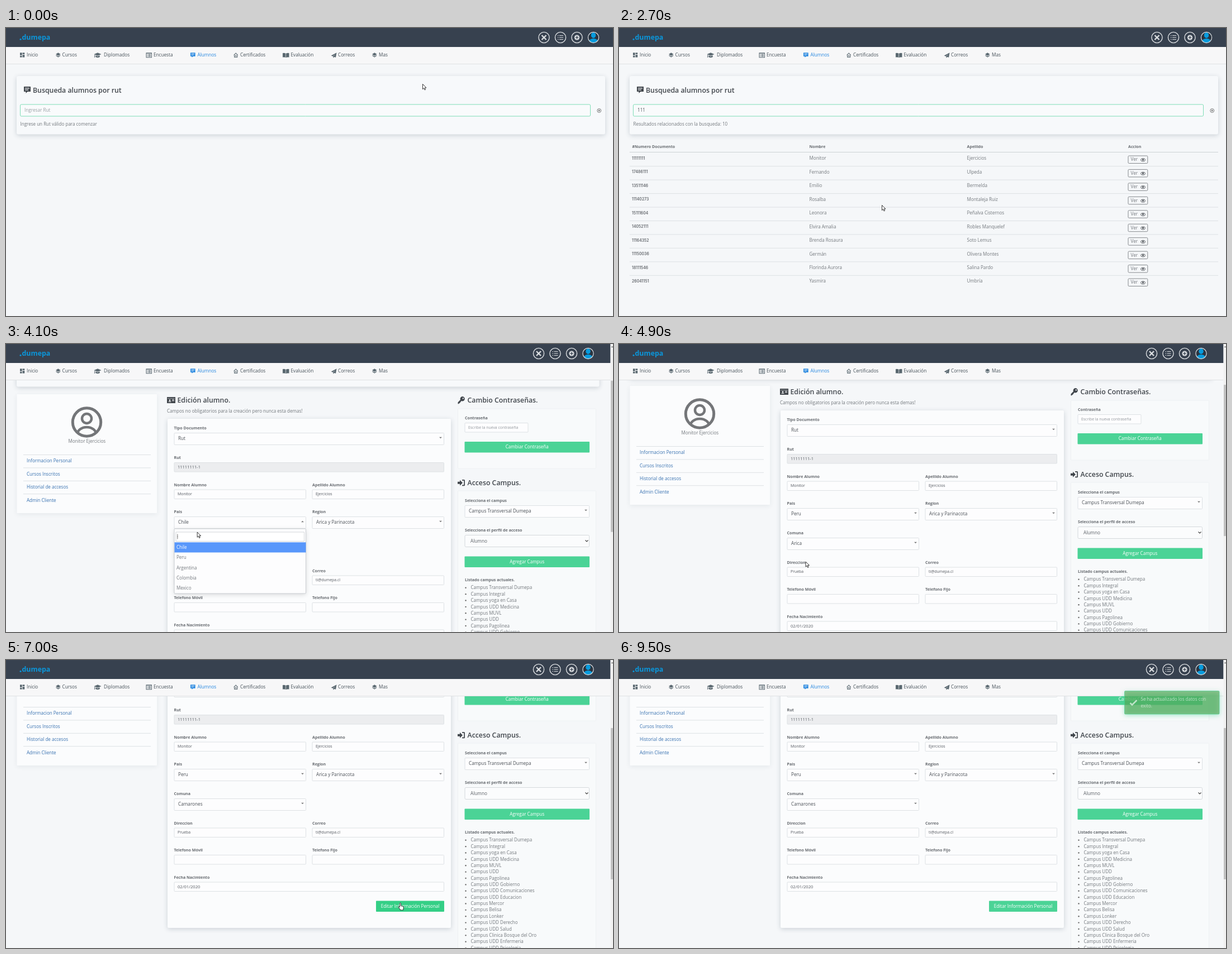
An HTML page with a canvas that plays this animation: 1086 px wide and 516 px high, repeating every 9.6 s.

```html
<!DOCTYPE html>
<html lang="es">
<head>
<meta charset="utf-8">
<title>Busqueda alumnos</title>
<style>
html, body { margin: 0; width: 100%; height: 100%; overflow: hidden; background: #f5f7f9; }
canvas { display: block; width: 1086px; height: 516px; }
</style>
</head>
<body>
<canvas id="stage"></canvas>
<script>
const LOOP = 9600, STEP = 100, W = 1086, H = 516;
const canvas = document.getElementById('stage');
const c = canvas.getContext('2d');
const dpr = window.devicePixelRatio || 1;
canvas.width = W * dpr;
canvas.height = H * dpr;

const GREY = '#73787d', DARK = '#41464c', LABEL = '#676b70', LINE = '#dde1e4', GREEN = '#4bd396';
const BASE_SCROLL = 109;   // scroll offset at which the form coordinates below are given
const PAGE_CHANGE = 2800;

const ICONS = {
  grid: 'M0 0h3.7v4.6H0zM4.6 0h3.7v2.8H4.6zM0 5.5h3.7v2.8H0zM4.6 3.7h3.7v4.6H4.6z',
  layers: 'M4.3 0l4.3 2.8-4.3 2.8L0 2.8zM1 4.5l3.3 2 3.3-2 1 .8-4.3 2.9L0 5.3z',
  cap: 'M0 2.8L6.5 0 13 2.8 6.5 5.6zM2.8 4.9l3.7 1.7 3.7-1.7v3q-3.7 2-7.4 0zM.8 3.5h.8v5H.4z',
  table: 'M0 0h10.5v9H0zM1 1.6h8.5V8H1zM2 2.6h1v1H2zM4 2.6h4.5v1H4zM2 4.3h1v1H2zM4 4.3h4.5v1H4zM2 6h1v1H2zM4 6h4.5v1H4z',
  comment: 'M0 0h12v9H6.5L3.5 12V9H0zM2 2.3h8v1.2H2zM2 5.2h6v1.2H2z',
  home: 'M4.2 0l4.2 4.2H7.3v4.3H1.1V4.2H0zM4.2 1.6L2.2 3.6v3.8h4V3.6zM3.4 4.2H5v2H3.4z',
  book: 'M0 .8Q3 0 5.4 1.2v7.6Q3 7.6 0 8.3zM6.1 1.2Q9 0 11.5.8v7.5Q9 7.6 6.1 8.8z',
  plane: 'M10 0L8.5 8.6 5.7 7.5 4.2 9.6 3.6 6.6 0 5.2zM8 2.2L3.8 6l.7.3z',
  idCard: 'M0 0h15v11H0zM1 2h13v.6H1zM5 4.3a1.4 1.4 0 1 0 .01 0zM2.3 9q.2-1.6 2.7-1.6T7.7 9zM9 4.2h4v1H9zM9 6.3h4v1H9z',
  key: 'M8.3 0a4.2 4.2 0 1 1-2 8L5 9.2v1.4H3.6V12H2v1.3H0v-2.8l4.4-4.6A4.2 4.2 0 0 1 8.3 0zM9.3 2.2a1.2 1.2 0 1 0 .01 0z',
  signIn: 'M0 3.8h4V.8l5 5-5 5v-3H0zM8 0h3.5Q13 0 13 1.5v8.3q0 1.5-1.5 1.5H8V9.6h3.3V1.7H8z',
  arrow: 'M0 0v9.2l2.1-2 1.5 3.3 1.5-.7-1.5-3.2h2.9z',
  hand: 'M-1 1q0-1.2 1-1.2t1 1.2v4l4 1q1 .3.9 1.5l-.6 3.5v1.5h-5.5l-.3-1.5-3-3.5q-.2-1.5 1.2-1l1.3 1z'
};
for (const name in ICONS) ICONS[name] = new Path2D(ICONS[name]);

const NAV = [
  ['grid', 25, 'Inicio', 37], ['layers', 89, 'Cursos', 100.5], ['cap', 157.5, 'Diplomados', 175],
  ['table', 250.5, 'Encuesta', 264], ['comment', 330, 'Alumnos', 342.5], ['home', 407, 'Certificados', 419],
  ['book', 495, 'Evaluación', 509.5], ['plane', 581.5, 'Correos', 594], ['layers', 655, 'Mas', 667]
];
const STUDENTS = [
  ['11111111', 'Monitor', 'Ejercicios'], ['17486111', 'Fernando', 'Ulpeda'],
  ['13511146', 'Emilio', 'Bermelda'], ['11140273', 'Rosalba', 'Montaleja Ruiz'],
  ['15111604', 'Leonora', 'Peñalva Cisternos'], ['14052111', 'Elvira Amalia', 'Robles Manquelef'],
  ['11164352', 'Brenda Rosaura', 'Soto Lemus'], ['11150036', 'Germán', 'Olivera Montes'],
  ['18111546', 'Florinda Aurora', 'Salina Pardo'], ['26041151', 'Yasmira', 'Umbría']
];
const CAMPUSES = ['Transversal Dumepa', 'Integral', 'yoga en Casa', 'UDD Medicina', 'MUVL', 'UDD', 'Pagolinea',
  'UDD Gobierno', 'UDD Comunicaciones', 'UDD Educacion', 'Mercor', 'Belisa', 'Lonker', 'UDD Derecho',
  'UDD Salud', 'Clinica Bosque del Oro', 'UDD Enfermeria', 'UDD Psicologia'];
const COUNTRIES = ['Chile', 'Peru', 'Argentina', 'Colombia', 'Mexico'];
const COMMUNES = ['Arica', 'Camarones', 'General Lagos', 'Putre', 'Alto Hospicio', 'Iquique'];

// time, x, y of the pointer tip
const POINTER = [
  [0, 745.5, 100.5], [100, 735, 102], [700, 235, 146], [1000, 325, 163], [1300, 325, 163], [1900, 925, 232],
  [2200, 925, 234], [2700, 470.5, 317.5], [3200, 355, 365.5], [3600, 345, 320], [4000, 345, 320],
  [4300, 334, 386], [4900, 334, 390], [5300, 334, 385], [5700, 334.5, 257], [5900, 334.5, 257],
  [6300, 331, 320], [6500, 331, 321], [7000, 705.5, 435.5], [LOOP, 705.5, 435.5]
];
const HAND_SPANS = [[1800, 2300], [3600, 4100], [5700, 6000], [6900, 9300]];

const within = (t, from, to) => t >= from && t < to;
const clamp = v => Math.max(0, Math.min(1, v));
const smooth = v => { v = clamp(v); return v * v * (3 - 2 * v); };

function text(s, x, y, { size = 8.05, color = GREY, weight = 400, align = 'left', font = '"Open Sans", "Noto Sans"' } = {}) {
  c.font = `${weight} ${size}px ${font}, sans-serif`;
  c.textAlign = align;
  c.fillStyle = color;
  c.fillText(s, x, y + size * .36);
}
const label = (s, x, y) => text(s, x, y, { size: 7.1, weight: 700, color: LABEL });
const heading = (s, x, y) => text(s, x, y, { size: 12.3, weight: 600, color: DARK });

function box(x, y, right, bottom, { fill, stroke, radius = 1, shadow } = {}) {
  c.save();
  c.beginPath();
  c.roundRect(x, y, right - x, bottom - y, radius);
  if (shadow) { c.shadowColor = shadow; c.shadowBlur = 9 * dpr; c.shadowOffsetY = 2 * dpr; }
  if (fill) { c.fillStyle = fill; c.fill(); }
  c.shadowColor = 'transparent';
  if (stroke) { c.strokeStyle = stroke; c.lineWidth = 1; c.stroke(); }
  c.restore();
}

function rule(x, right, y, color = LINE) {
  c.fillStyle = color;
  c.fillRect(x, y - .5, right - x, 1);
}

function icon(name, x, y, color, scale = 1) {
  c.save();
  c.translate(x, y);
  c.scale(scale, scale);
  c.fillStyle = color;
  c.fill(ICONS[name], 'evenodd');
  c.restore();
}

function circle(x, y, r, { fill, stroke, width = 1 }) {
  c.beginPath();
  c.arc(x, y, r, 0, Math.PI * 2);
  if (fill) { c.fillStyle = fill; c.fill(); }
  if (stroke) { c.strokeStyle = stroke; c.lineWidth = width; c.stroke(); }
}

function line(points, color, width) {
  c.beginPath();
  points.forEach(([x, y]) => c.lineTo(x, y));
  c.strokeStyle = color;
  c.lineWidth = width;
  c.stroke();
}

function triangle(x, y, up, size = 2.4, color = '#777') {
  const d = up ? -1 : 1;
  c.beginPath();
  c.moveTo(x - size, y - d * size / 2);
  c.lineTo(x + size, y - d * size / 2);
  c.lineTo(x, y + d * size / 2);
  c.fillStyle = color;
  c.fill();
}

function input(value, x, right, y, { fill = '#fdfdfe', size = 6.9, color = '#555a60' } = {}) {
  box(x, y + .5, right, y + 17, { fill, stroke: LINE });
  text(value, x + 6, y + 8.5, { size, color });
}

function select(value, x, right, y, open) {
  box(x, y + .5, right, y + 21.5, { fill: '#fdfdfe', stroke: LINE });
  text(value, x + 7, y + 10.5, { size: 8.2, color: '#4b5056' });
  triangle(right - 6, y + 9, open);
}

function button(caption, x, right, y, fill = GREEN) {
  box(x, y, right, y + 19.5, { fill });
  text(caption, (x + right) / 2, y + 9.3, { color: '#fff', align: 'center' });
}

function dropdown(options, active, y, scrollable) {
  const bottom = scrollable ? y + 161 : y + 47 + options.length * 18.2;
  const right = scrollable ? 526.5 : 536.5;
  box(301, y + 22, 536.5, bottom, { fill: '#fdfdfe', stroke: '#c9cdd1', shadow: 'rgba(0,0,0,.15)' });
  box(304, y + 28, 533.5, y + 44.5, { fill: '#fff', stroke: '#d3d7da', radius: 0 });
  rule(306.5, 307.3, y + 36, '#555');
  c.fillStyle = '#555';
  c.fillRect(306.5, y + 31.5, .8, 9);
  options.forEach((option, i) => {
    const on = i === active;
    if (on) box(301.5, y + 46.5, right, y + 46.5, {});
    if (on) { c.fillStyle = '#5897fb'; c.fillRect(301.5, y + 46.3 + i * 18.2, right - 301.5, 18.2); }
    text(option, 305, y + 55.3 + i * 18.2, { color: on ? '#fff' : GREY });
  });
  if (!scrollable) return;
  c.fillStyle = '#f1f1f1';
  c.fillRect(526.5, y + 46.3, 9.5, 114);
  c.fillStyle = '#c1c1c1';
  c.fillRect(527.5, y + 56, 7.5, 10);
  triangle(531.3, y + 52, true, 2, '#999');
  triangle(531.3, y + 155.5, false, 2, '#444');
}

function searchCard(right, query, hint) {
  box(19, 86, right, 190.5, { fill: '#f7f9fb', radius: 3, shadow: 'rgba(40,60,80,.2)' });
  icon('comment', 32, 105, DARK);
  heading('Busqueda alumnos por rut', 48, 111.5);
  box(25.5, 137, right - 26.5, 158, { fill: '#f9fbfc', stroke: '#7fdcb6', radius: 2 });
  text(query || 'Ingresar Rut', 33, 147, { size: 8.2, color: query ? '#555a60' : '#9aa0a5' });
  circle(right - 10.8, 148, 3.4, { stroke: '#666', width: .9 });
  circle(right - 10.8, 148, 1.4, { fill: '#777' });
  text(hint, 25.5, 172);
}

function resultsTable() {
  [['#Numero Documento', 23.5], ['Nombre', 340.5], ['Apellido', 622.5], ['Accion', 911]]
    .forEach(([s, x]) => label(s, x, 212));
  rule(19, 1072, 222.5, '#cdd2d5');
  STUDENTS.forEach(([id, first, last], i) => {
    const y = 233.5 + i * 24.45;
    text(id, 23, y, { size: 6.9, weight: 600, color: '#63676c', font: 'Inter' });
    text(first, 340.5, y);
    text(last, 622.5, y);
    box(911, y - 4.5, 945.8, y + 9, { stroke: '#85898d', radius: 1.5 });
    text('Ver', 915.5, y + 2);
    c.beginPath();
    c.ellipse(937.5, y + 2.8, 4, 2.6, 0, 0, Math.PI * 2);
    c.strokeStyle = '#5c6065';
    c.lineWidth = 1;
    c.stroke();
    circle(937.5, y + 2.5, 1.7, { fill: '#5c6065' });
    if (i < 9) rule(19, 1072, y + 14.2);
  });
}

function profileCard() {
  box(19.5, 95, 270, 308, { fill: '#fbfcfd', shadow: 'rgba(40,60,80,.08)' });
  c.save();
  circle(144.5, 145, 25.2, { stroke: '#747679', width: 5 });
  circle(144.5, 138.5, 8.5, { stroke: '#747679', width: 4.5 });
  c.beginPath();
  c.arc(144.5, 145, 25, 0, Math.PI * 2);
  c.clip();
  c.beginPath();
  c.ellipse(144.5, 167, 17, 13, 0, Math.PI, 0);
  c.strokeStyle = '#747679';
  c.lineWidth = 4.5;
  c.stroke();
  c.restore();
  text('Monitor Ejercicios', 144.8, 179.5, { align: 'center' });
  ['Informacion Personal', 'Cursos Inscritos', 'Historial de accesos', 'Admin Cliente'].forEach((s, i) => {
    rule(31, 259, 203.5 + i * 23.4);
    text(s, 37, 214.5 + i * 23.4, { color: '#3670b0' });
  });
}

function studentForm(t) {
  const countryOpen = within(t, 3900, 4500), communeOpen = within(t, 5800, 6600);
  icon('idCard', 288, 100, DARK);
  heading('Edición alumno.', 306.5, 106);
  text('Campos no obligatorios para la creación pero nunca esta demas!', 288, 125.5);
  box(289, 139, 796, 599, { fill: '#fbfcfd', radius: 2, shadow: 'rgba(40,60,80,.2)' });
  [['Tipo Documento', 300.5, 155.5], ['Rut', 300.5, 208.5], ['Nombre Alumno', 300.5, 257], ['Apellido Alumno', 548, 257],
    ['Pais', 300.5, 305.5], ['Region', 548, 305.5], ['Comuna', 300.5, 358], ['Direccion', 300.5, 411],
    ['Correo', 548, 411], ['Telefono Móvil', 300.5, 459.5], ['Telefono Fijo', 548, 459.5], ['Fecha Nacimiento', 300.5, 508]
  ].forEach(args => label(...args));
  select('Rut', 301, 783.5, 164);
  input('11111111-1', 301, 783.5, 217, { fill: '#ecedef', size: 7.5 });
  input('Monitor', 301, 536.5, 265.5);
  input('Ejercicios', 548, 783.5, 265.5);
  select(t < 4500 ? 'Chile' : 'Peru', 301, 536.5, 314, countryOpen);
  select('Arica y Parinacota', 548, 783.5, 314);
  select(t < 6600 ? 'Arica' : 'Camarones', 301, 536.5, 367, communeOpen);
  input('Prueba', 301, 536.5, 419.5);
  input('ti@dumepa.cl', 548, 783.5, 419.5);
  input('', 301, 536.5, 468);
  input('', 548, 783.5, 468);
  input('02/01/2020', 301, 783.5, 516.5, { size: 7.6 });
  button('Editar Información Personal', 662, 784, 550.5, within(t, 6900, 9300) ? '#34cf86' : GREEN);
  if (countryOpen) dropdown(COUNTRIES, t < 4200 ? 0 : 1, 314, false);
  if (communeOpen) dropdown(COMMUNES, t < 6200 ? 0 : 1, 367, true);
}

function accessPanels() {
  icon('key', 808.5, 99, DARK);
  heading('Cambio Contraseñas.', 825.5, 106);
  box(808.5, 121, 1055.5, 228, { fill: '#f8fafb', stroke: '#eef1f3' });
  label('Contraseña', 821, 137.5);
  input('Escribe la nueva contraseña', 821, 934, 146, { color: '#92979c' });
  button('Cambiar Contraseña', 820.5, 1044, 180);
  icon('signIn', 808, 248, DARK);
  heading('Acceso Campus.', 825.5, 254);
  box(808.5, 268, 1055.5, 700, { fill: '#f8fafb', stroke: '#eef1f3' });
  label('Selecciona el campus', 821, 285.5);
  select('Campus Transversal Dumepa', 821, 1043.5, 294);
  label('Selecciona el perfil de acceso', 821, 338.5);
  box(821, 347.5, 1043.5, 368.5, { fill: '#fbfcfd', stroke: '#d5d9dc', radius: 2 });
  text('Alumno', 831, 358, { size: 8.2, color: '#5b6066' });
  line([[1036.5, 356.5], [1039, 359], [1041.5, 356.5]], '#444', 1.2);
  button('Agregar Campus', 820.5, 1044, 385.5);
  label('Listado campus actuales.', 821, 427.5);
  CAMPUSES.forEach((s, i) => {
    const y = 441.5 + i * 11.37;
    circle(822.5, y + .3, 1.2, { fill: '#666' });
    text('Campus ' + s, 831.5, y);
  });
}

function topBars(shift, right) {
  c.fillStyle = '#f7f7f8';
  c.fillRect(0, 34, right, 30);
  rule(0, right, 64.5, '#e0e2e4');
  c.fillStyle = '#37414f';
  c.fillRect(0, 0, right, 34);
  circle(26, 20.3, 1.5, { fill: '#0a97dc' });
  text('dumepa', 28.5, 16.5, { size: 12.4, weight: 700, color: '#0a97dc' });
  const light = '#dadde0', [tools, list, add, user] = [962.5, 992, 1021.5, 1051].map(x => x - shift);
  [tools, list, add].forEach(x => circle(x, 17, 9.6, { stroke: light, width: 1.4 }));
  line([[tools - 4, 13], [tools + 4, 21]], light, 2.4);
  line([[tools + 4, 13], [tools - 4, 21]], light, 2.4);
  [13.5, 17, 20.5].forEach(y => {
    rule(list - 5, list - 3.5, y, light);
    rule(list - 2, list + 5, y, light);
  });
  circle(add, 17, 4.6, { fill: light });
  line([[add - 2.7, 17], [add + 2.7, 17]], '#37414f', 1.3);
  line([[add, 14.3], [add, 19.7]], '#37414f', 1.3);
  c.save();
  circle(user, 17, 9.6, { fill: '#2b3440' });
  c.clip();
  c.fillStyle = '#079bdd';
  c.beginPath();
  c.ellipse(user, 13, 4.2, 5, 0, 0, Math.PI * 2);
  c.ellipse(user, 25.5, 8.5, 6.8, 0, 0, Math.PI * 2);
  c.fill();
  c.restore();
  circle(user, 17, 9.6, { stroke: light, width: 1.2 });
  NAV.forEach(([name, x, s, textX]) => {
    const active = s === 'Alumnos';
    icon(name, x, 44.2, active ? '#2587e0' : '#5a6870', active ? .72 : 1);
    text(s, textX, 48.2, { size: 8.2, color: active ? '#2587e0' : '#465159' });
  });
}

function scrollbar(scroll) {
  c.fillStyle = '#f1f1f1';
  c.fillRect(1081.5, 0, 4.5, H);
  c.fillStyle = '#c1c1c1';
  c.fillRect(1082, 9.5 + scroll * .493, 4, 271);
  triangle(1084.5, 5, true, 1.8, '#666');
}

function toast(t) {
  const alpha = smooth((t - 7700) / 500) * (1 - smooth((t - 9200) / 1000));
  if (!alpha) return;
  c.save();
  c.globalAlpha = alpha * .8;
  box(904.5, 55.5, 1074, 97, { fill: '#51a351', stroke: '#3fcf8e', radius: 1.5, shadow: 'rgba(75,211,150,.8)' });
  line([[914.5, 77], [918, 80.5], [926.5, 72]], '#fff', 2.6);
  text('Se ha actualizado los datos con', 933.5, 70.3, { color: '#fff' });
  text('exito.', 933.5, 81.7, { color: '#fff' });
  c.restore();
}

function pointer(t) {
  if (t >= 9300) return;
  const i = POINTER.findIndex(key => key[0] > t);
  const [t0, x0, y0] = POINTER[i - 1], [t1, x1, y1] = POINTER[i];
  const k = smooth((t - t0) / (t1 - t0));
  const path = ICONS[HAND_SPANS.some(([a, b]) => within(t, a, b)) ? 'hand' : 'arrow'];
  c.save();
  c.translate(x0 + (x1 - x0) * k, y0 + (y1 - y0) * k);
  c.fillStyle = '#fff';
  c.fill(path);
  c.strokeStyle = '#222';
  c.lineWidth = .9;
  c.lineJoin = 'round';
  c.stroke(path);
  c.restore();
}

function draw(t) {
  c.setTransform(dpr, 0, 0, dpr, 0, 0);
  c.fillStyle = '#f5f7f9';
  c.fillRect(0, 0, W, H);
  const query = '1'.repeat(Math.max(0, Math.min(3, Math.floor((t - 700) / 200))));
  const found = t >= 1500;
  const hint = found ? 'Resultados relacionados con la busqueda: 10' : 'Ingrese un Rut válido para comenzar';
  if (t < PAGE_CHANGE) {
    searchCard(1072, query, hint);
    if (found) resultsTable();
    topBars(0, W);
  } else {
    const scroll = 114 * (smooth((t - 2900) / 345) + smooth((t - 4800) / 440));
    c.save();
    c.translate(0, -scroll);
    searchCard(1061.5, query, hint);
    c.translate(0, BASE_SCROLL);
    profileCard();
    accessPanels();
    studentForm(t);
    c.restore();
    topBars(9.5, 1081.5);
    scrollbar(scroll);
    toast(t);
  }
  pointer(t);
}

const start = performance.now();
function tick() {
  const t = (performance.now() - start) % LOOP;
  draw(Math.floor(t / STEP) * STEP);
  requestAnimationFrame(tick);
}
tick();
</script>
</body>
</html>
```
